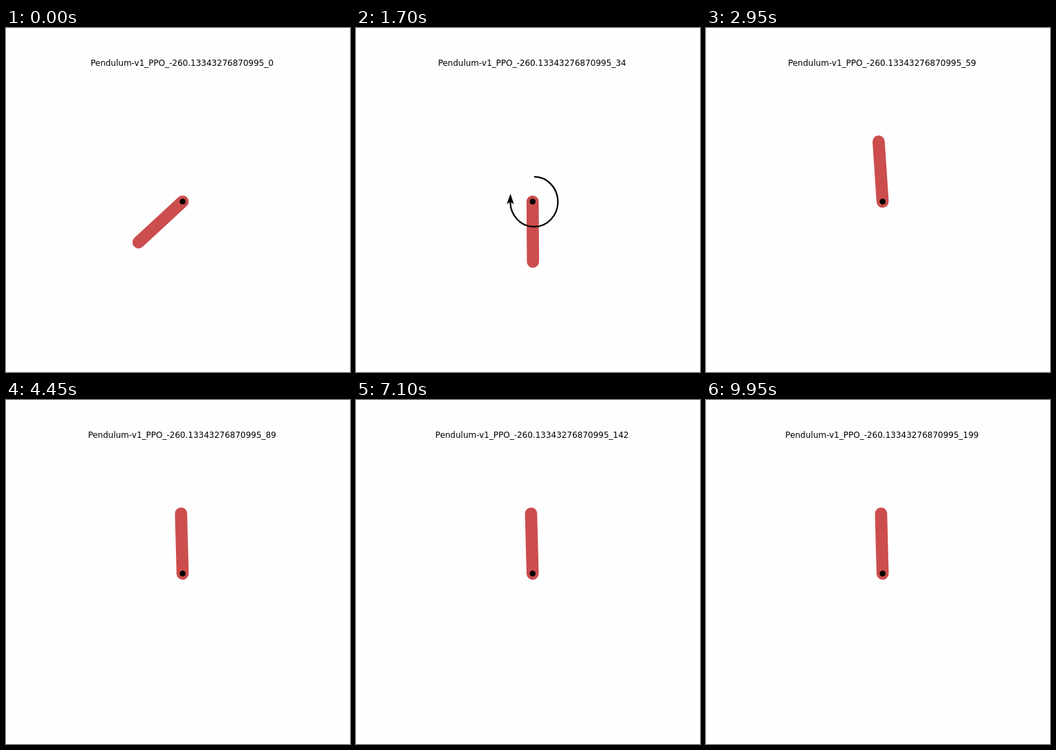
These frames come from a looping animation (500 by 500 pixels, 10 s). An HTML page with a canvas:

```html
<!DOCTYPE html>
<html lang="en">
<head>
<meta charset="utf-8">
<title>Pendulum</title>
<style>
  html, body { margin: 0; width: 100%; height: 100%; overflow: hidden; background: #fefefe; }
  canvas { display: block; }
</style>
</head>
<body>
<canvas id="stage" width="500" height="500"></canvas>
<script>
const ctx = document.getElementById("stage").getContext("2d");
const STEP_MS = 50, STEPS = 200, DT = STEP_MS / 1000;
const PIVOT = [256.7, 252.3], ROD = 87.3, ROD_WIDTH = 17.7;
const REST = 0.026;

const clamp = (x, lo, hi) => Math.min(hi, Math.max(lo, x));

// Angle is measured counterclockwise from upright.
// The torque pumps the swing first, then brakes the rod into its rest pose.
function policy(n, angle, speed) {
  const pump = Math.min(0.8 * (n - 4.85), 0.4 * (28.7 - n));
  const brake = -11 * (angle - REST) - 2.75 * speed - 5 * Math.sin(REST);
  return clamp(angle > 2 ? pump : brake, -1.87, 2);
}

function simulate() {
  let angle = 2.3176, speed = -0.3;
  const states = [{ angle, torque: 0 }];
  for (let n = 1; n < STEPS; n++) {
    const torque = policy(n, angle, speed);
    speed += (15 * Math.sin(angle) + 3 * torque) * DT;
    angle += speed * DT;
    states.push({ angle, torque });
  }
  return states;
}

function drawRod(angle) {
  ctx.strokeStyle = "#cc4d4d";
  ctx.lineWidth = ROD_WIDTH;
  ctx.lineCap = "round";
  ctx.beginPath();
  ctx.moveTo(0, 0);
  ctx.lineTo(-ROD * Math.sin(angle), -ROD * Math.cos(angle));
  ctx.stroke();
}

// Circular arrow, mirrored for clockwise torque.
function drawTorque(torque) {
  const size = Math.abs(torque) / 2;
  if (size < 0.08) return;
  ctx.save();
  ctx.scale(Math.sign(torque) * size, size);
  ctx.strokeStyle = "#000";
  ctx.lineWidth = 2.4;
  ctx.lineCap = "butt";
  ctx.beginPath();
  ctx.ellipse(-2.3, 0.3, 37, 38.9, 0, -Math.PI / 2, 0, true);
  ctx.stroke();
  ctx.beginPath();
  ctx.moveTo(34.5, -12);
  ctx.lineTo(40.2, 4);
  ctx.lineTo(34.7, 0.5);
  ctx.lineTo(29, 4);
  ctx.fill();
  ctx.restore();
}

function draw(n, { angle, torque }) {
  ctx.fillStyle = "#fefefe";
  ctx.fillRect(0, 0, 500, 500);
  ctx.fillStyle = "#000";
  ctx.font = '12px "DejaVu Sans", sans-serif';
  ctx.textAlign = "center";
  ctx.fillText("Pendulum-v1_PPO_-260.13343276870995_" + n, 255.9, 55);

  ctx.save();
  ctx.translate(...PIVOT);
  drawRod(angle);
  drawTorque(torque);
  ctx.beginPath();
  ctx.arc(0, 0, 4.3, 0, 2 * Math.PI);
  ctx.fill();
  ctx.restore();
}

const states = simulate();

function tick() {
  const n = Math.floor(performance.now() / STEP_MS) % STEPS;
  draw(n, states[n]);
  requestAnimationFrame(tick);
}
tick();
</script>
</body>
</html>
```
